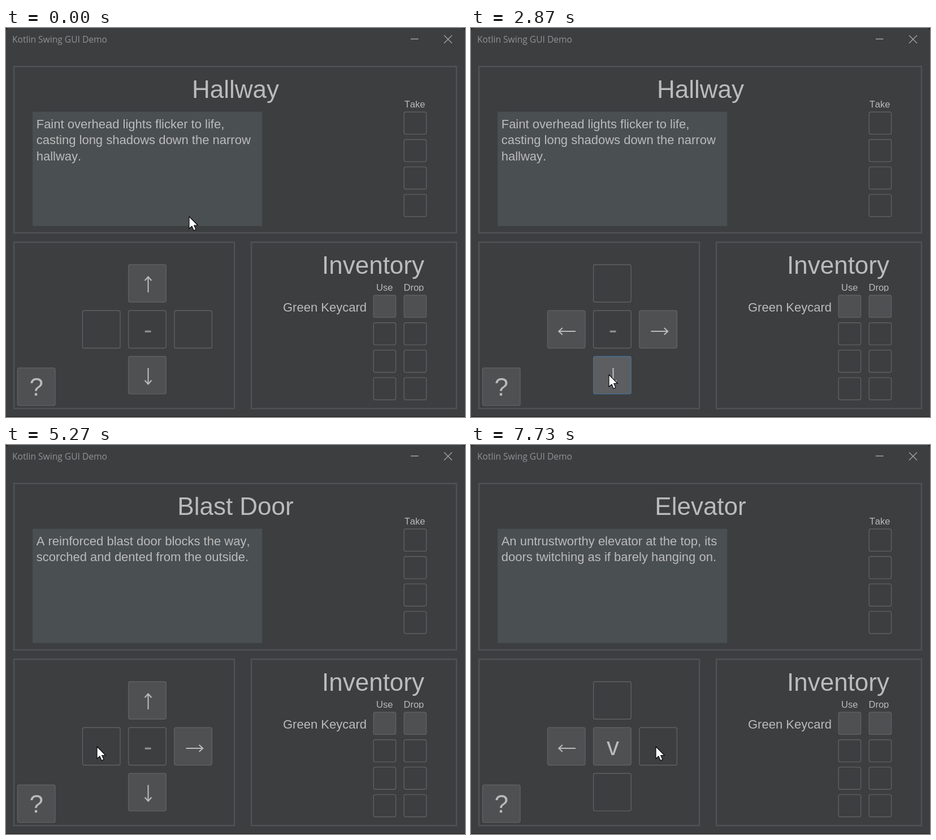
These frames come from a looping animation (812 by 690 pixels, 8000 ms). An HTML page:

```html
<!DOCTYPE html>
<html lang="en">
<head>
<meta charset="utf-8">
<title>Kotlin Swing GUI Demo</title>
<style>
  html, body { margin: 0; width: 100%; height: 100%; overflow: hidden; background: #232324; }
  svg { display: block; width: 100vw; height: 100vh; }
  text { font-family: "Liberation Sans", Arial, sans-serif; font-kerning: none; fill: #bbb; white-space: pre; }
  .bar { font: 15.6px "Open Sans", "Noto Sans", sans-serif; fill: #909294; }
  .big { font-size: 44px; }
  .body { font-size: 22px; }
  .tag { font-size: 16.5px; }
  .mid { text-anchor: middle; }
  .panel { fill: none; stroke: #4f5254; stroke-width: 2.5; }
  .btn rect { fill: #3c3e40; stroke: #5e6062; stroke-width: 1.4; }
  .btn.on rect { fill: #4e5052; }
  .btn.hover rect { fill: #55575a; stroke: #466d94; }
  .btn.press rect { fill: #5c5e61; stroke: #466d94; }
  .btn path { fill: none; stroke: #bbb; stroke-width: 2.1; visibility: hidden; }
  .btn.on path, .btn.dim path { visibility: visible; }
  .btn.dim path { stroke: #8c8c8c; }
  .btn.dim.fresh path { stroke: #a6a6a6; }
  .btn.off text { fill: #8c8c8c; }
  .win { fill: none; stroke: #a4a6a8; stroke-width: 1.3; }
</style>
</head>
<body>
<svg viewBox="0 0 812 690" preserveAspectRatio="none">
  <path fill="#3c3e40" d="M0 689V7Q0 0 7 0H805Q812 0 812 7V689Z"/>
  <text class="bar" x="11" y="26">Kotlin Swing GUI Demo</text>
  <path class="win" d="M716 19.5H729.5M775 13L789 27M789 13L775 27"/>
  <rect class="panel" x="14" y="68.3" width="783" height="295"/>
  <rect class="panel" x="14" y="380" width="390" height="295"/>
  <rect class="panel" x="434" y="380" width="363" height="295"/>
  <rect x="47" y="148.5" width="406.3" height="202.7" fill="#4a4f51"/>
  <text class="big mid" id="title" x="406" y="124"></text>
  <g class="body" id="story"></g>
  <text class="tag" x="704.7" y="141">Take</text>
  <text class="big" x="559" y="435.5">Inventory</text>
  <clipPath id="cut"><rect x="640" y="450" width="110" height="17.3"/></clipPath>
  <g clip-path="url(#cut)">
    <text class="tag" x="655" y="466">Use</text>
    <text class="tag" x="703.5" y="466">Drop</text>
  </g>
  <text class="body" x="490" y="503" id="item">Green Keycard</text>
  <g id="buttons"></g>
  <path id="cursor" fill="#fff" stroke="#000" stroke-width="1.1" stroke-linejoin="round"
        d="M0 0V21.5L4.9 17L8.2 24.6L12 23L8.7 15.5H15.3Z"/>
</svg>
<script>
const $ = id => document.getElementById(id);
const STEP = 1000 / 15, STEPS = 120;

function make(tag, parent, attrs, text) {
  const el = document.createElementNS('http://www.w3.org/2000/svg', tag);
  for (const k in attrs) el.setAttribute(k, attrs[k]);
  if (text) el.textContent = text;
  return parent.appendChild(el);
}

function button(x, y, size, cls = '') {
  const g = make('g', $('buttons'), { class: 'btn ' + cls });
  make('rect', g, { x, y, width: size, height: size, rx: 3 });
  return g;
}

// Small item buttons
for (let i = 0; i < 4; i++) {
  const dy = i * 48.7, cls = i ? '' : 'on';
  button(704.2, 149 + dy, 39.4);
  button(650.2, 474 + dy, 39.4, cls);
  button(704.2, 474 + dy, 39.4, cls);
}

// Direction pad
const SIZE = 66.6;
const pad = {
  u: { x: 216.6, y: 419.7, d: 'M251.5 469V441.5M245.6 448L251.5 441.3L257.4 448' },
  l: { x: 135.4, y: 501.2, d: 'M185 538H156M161.8 532L155.3 538L161.8 544' },
  r: { x: 297.8, y: 501.2, d: 'M318.5 538H347.5M341.7 532L348.2 538L341.7 544' },
  d: { x: 216.6, y: 582.5, d: 'M251.5 603V631.5M245.6 625L251.5 631.7L257.4 625' }
};
for (const p of Object.values(pad)) {
  p.el = button(p.x, p.y, SIZE);
  make('path', p.el, { d: p.d });
}
const lift = button(216.6, 501.2, SIZE);
const liftText = make('text', lift, { class: 'big mid', x: 251, y: 550 }, '-');
const help = button(20.4, 603, SIZE, 'on');
make('text', help, { class: 'big mid', x: 53.7, y: 652 }, '?');

const hall = exits => ({
  name: 'Hallway', exits,
  lines: ['Faint overhead lights flicker to life,', 'casting long shadows down the narrow', 'hallway.']
});
const rooms = {
  south: hall('ud'),
  east: { ...hall('lr'), locked: 'u' },
  fork: hall('lrd'),
  bend: hall('ur'),
  west: hall('lr'),
  blast: {
    name: 'Blast Door', exits: 'urd',
    lines: ['A reinforced blast door blocks the way,', 'scorched and dented from the outside.']
  },
  red: {
    name: 'Red Door', exits: 'u',
    lines: ['A sealed red door blocks the way, its', 'keycard reader blinking.']
  },
  top: {
    name: 'Elevator', exits: 'l', lift: true,
    lines: ['An untrustworthy elevator at the top, its', 'doors twitching as if barely hanging on.']
  }
};

// [step, room]
const visits = [
  [0, 'south'], [9, 'blast'], [20, 'east'], [31, 'fork'], [45, 'red'], [58, 'fork'],
  [70, 'east'], [79, 'blast'], [93, 'south'], [99, 'bend'], [111, 'west'], [116, 'top']
];
// [first step, last step, x, y]
const moves = [
  [1, 7, 253, 446], [13, 18, 327, 553], [36, 41, 244, 615], [49, 55, 256, 444],
  [61, 68, 161, 535], [84, 91, 246, 616], [103, 109, 327, 535]
];
// [mouse down, mouse up]
const presses = [[8, 9], [43, 45], [69, 70], [78, 79], [92, 93], [97, 99]];

function pointer(k) {
  let x = 324, y = 334.5;
  for (const [a, b, tx, ty] of moves) {
    if (k < a) break;
    const p = Math.min(1, (k - a + 1) / (b - a + 1));
    const e = p * p * (3 - 2 * p);
    x += (tx - x) * e;
    y += (ty - y) * e;
  }
  return [x, y];
}

let shown;
function showRoom(room) {
  if (shown === room) return;
  shown = room;
  $('title').textContent = room.name;
  $('story').textContent = '';
  room.lines.forEach((s, i) => make('text', $('story'), { x: 53.7, y: 178 + i * 28.4 }, s));
  liftText.textContent = room.lift ? 'v' : '-';
  lift.setAttribute('class', 'btn ' + (room.lift ? 'on' : 'off'));
}

function draw(k) {
  const [since, id] = visits.filter(v => v[0] <= k).pop();
  const room = rooms[id];
  showRoom(room);
  const [x, y] = pointer(k);
  const down = presses.some(([a, b]) => k >= a && k < b);
  for (const key in pad) {
    const p = pad[key];
    const over = x >= p.x && x <= p.x + SIZE && y >= p.y && y <= p.y + SIZE;
    let cls = 'btn';
    if (room.exits.includes(key)) cls += ' on' + (over ? (down ? ' press' : ' hover') : '');
    else if (room.locked === key) cls += ' dim' + (k - since < 4 ? ' fresh' : '');
    p.el.setAttribute('class', cls);
  }
  $('cursor').setAttribute('transform', `translate(${x} ${y})`);
}

const start = performance.now();
let last = -1;
function tick(now) {
  const k = Math.floor((Math.max(0, now - start) + 4) / STEP) % STEPS;
  if (k !== last) draw(last = k);
  requestAnimationFrame(tick);
}
draw(0);
requestAnimationFrame(tick);
</script>
</body>
</html>
```
